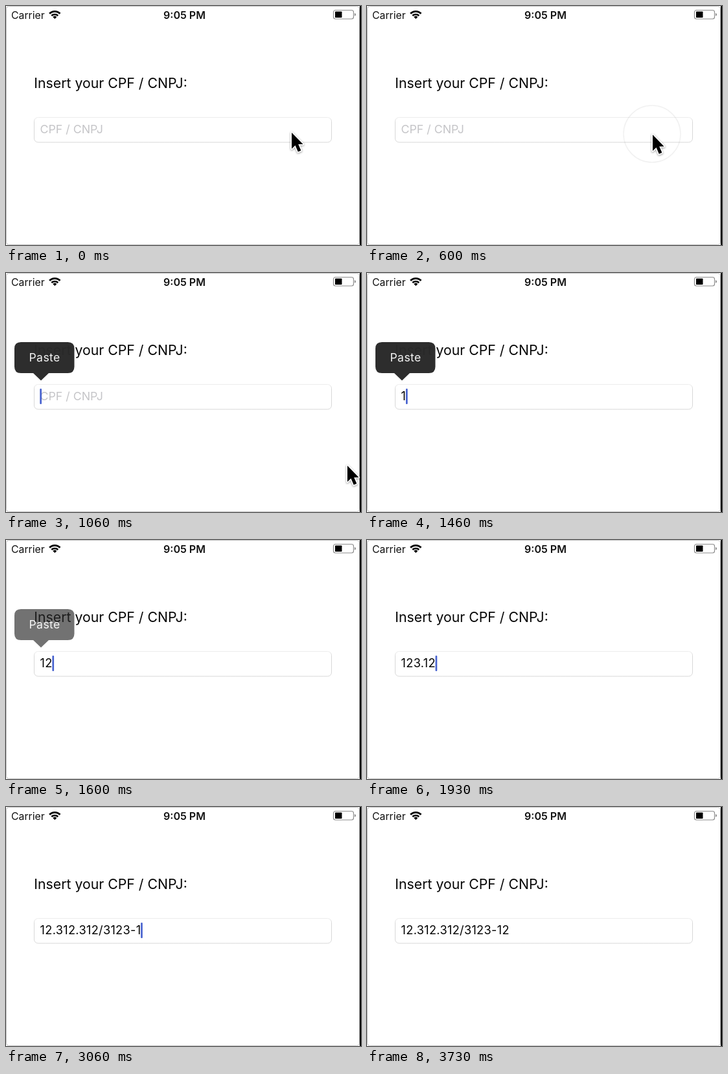
An HTML page that plays this animation: 548x370 px, repeating every 3.8 s.

```html
<!DOCTYPE html>
<html lang="en">
<head>
<meta charset="utf-8">
<title>Document number field</title>
<style>
  html, body { margin: 0; width: 100%; height: 100%; overflow: hidden; background: #fff; }
  svg { display: block; width: 548px; height: 370px; font-family: Inter, "Liberation Sans", sans-serif; }
  text { white-space: pre; }
  #pointer { filter: drop-shadow(0 1.5px 1.5px rgba(0, 0, 0, .4)); }
</style>
</head>
<body>
<svg viewBox="0 0 548 370">
  <linearGradient id="edge" x2="0" y2="1">
    <stop offset="0" stop-color="#ededed"/>
    <stop offset=".15" stop-color="#d8d8d8"/>
  </linearGradient>
  <rect width="548" height="370" fill="#fff"/>
  <rect x="546" width="2" height="370" fill="#000"/>
  <rect x=".5" y=".5" width="545" height="369" rx="4" fill="#fff" stroke="#c4c4c4"/>

  <!-- status bar -->
  <text x="8" y="19.5" font-size="15.8" fill="#111">Carrier</text>
  <g transform="translate(75.3 20)" fill="none" stroke="#000">
    <path d="M-8.2 -8.2A11.6 11.6 0 0 1 8.2 -8.2" stroke-width="2.7"/>
    <path d="M-5 -5A7.1 7.1 0 0 1 5 -5" stroke-width="2.5"/>
    <path d="M0 0L-3 -3A4.3 4.3 0 0 1 3 -3Z" fill="#000" stroke="none"/>
  </g>
  <text x="275.5" y="19.5" font-size="16" font-weight="600" text-anchor="middle" fill="#111">9:05 PM</text>
  <rect x="505.5" y="6.5" width="31" height="13.5" rx="3" fill="none" stroke="#8c8c8c" stroke-width="1.2"/>
  <rect x="508" y="8.5" width="10.5" height="9.5" rx=".8"/>
  <path d="M538 11Q540 11.5 540 13.3T538 15.6Z" fill="#8c8c8c"/>

  <text x="43.3" y="127" font-size="21.25" fill="#060606">Insert your CPF / CNPJ:</text>

  <!-- input -->
  <rect x="43.5" y="172.5" width="459" height="38.5" rx="6" fill="#fff" stroke="url(#edge)"/>
  <text id="hint" x="52.4" y="197.3" font-size="17.8" fill="#c5c5c8">CPF / CNPJ</text>
  <text id="value" x="52.6" y="197.3" font-size="18.2" letter-spacing=".3" fill="#060606"></text>
  <rect id="caret" y="179" width="2.7" height="24" rx="1" fill="#4863cf"/>

  <g id="menu">
    <path d="M23 107H95.5Q105.5 107 105.5 117V145Q105.5 155 95.5 155H66L54 166.5L42 155H23Q13 155 13 145V117Q13 107 23 107Z" fill="#292929" fill-opacity=".98"/>
    <text x="59.6" y="137.3" font-size="17.6" letter-spacing=".4" text-anchor="middle" fill="#f2f2f2">Paste</text>
  </g>

  <circle id="ring" cx="440" cy="198" fill="none" stroke="#777" stroke-width="1.5"/>
  <path id="pointer" d="M0 0V25L5.5 19.8L9.8 29.7L14.4 27.7L10.2 18.1H17.6Z" stroke="#fff" stroke-width="3.4" stroke-linejoin="round" paint-order="stroke"/>
</svg>
<script>
const LOOP = 3800;
const DIGITS = "12312312312312";
// tick at which each digit is typed
const KEYS = [22, 23, 25, 28, 29, 31, 33, 35, 36, 38, 39, 43, 44, 47];
const $ = id => document.getElementById(id);
const [hint, value, caret, menu, ring, pointer] =
  ["hint", "value", "caret", "menu", "ring", "pointer"].map($);

const clamp = x => Math.min(1, Math.max(0, x));
const mix = (a, b, k) => a + (b - a) * k;
const show = (el, alpha) => el.setAttribute("opacity", clamp(alpha));

// 15 ticks per second, starts rounded down to 10 ms
const tickAt = ms => Math.ceil((Math.floor(ms / 10) * 10 + 10) * 3 / 200) - 1;

// Groups digits as 3.3.3-2, or as 2.3.3/4-2 beyond eleven
function format(digits) {
  const long = digits.length > 11;
  const marks = long ? { 2: ".", 5: ".", 8: "/", 12: "-" } : { 3: ".", 6: ".", 9: "-" };
  return [...digits].map((d, i) => (marks[i] || "") + d).join("");
}

function caretAlpha(n) {
  if (n < 10) return 0;
  if (n < 17) return 1;
  if (n < 20) return (19 - n) / 3;
  if (n < 22) return (n - 19) / 3;
  return n < 54 ? 1 : (56 - n) / 3;
}

function menuAlpha(n) {
  if (n < 14 || n > 24) return 0;
  return n < 16 ? mix(.17, 1, (n - 14) / 2) : n < 24 ? 1 : .67;
}

function movePointer(n) {
  const leave = clamp((n - 14) / 2);
  const x = mix(441, 527, leave);
  const y = mix(196, 199.3, clamp((n - 3) / 4)) + 99 * leave;
  pointer.setAttribute("transform", `translate(${x} ${y})`);
  show(pointer, n < 17 ? 1 : 0);
}

function draw(ms) {
  const n = tickAt(ms % LOOP);
  const typed = KEYS.filter(k => k <= n).length;
  value.textContent = format(DIGITS.slice(0, typed));
  show(hint, typed ? 0 : 1);

  const end = typed ? value.getComputedTextLength() : 0;
  caret.setAttribute("x", 52.3 + end);
  show(caret, caretAlpha(n));
  show(menu, menuAlpha(n));

  const spread = (n - 4) / 5;
  ring.setAttribute("r", mix(14, 44, clamp(spread)));
  show(ring, spread < 0 || spread > 1 ? 0 : mix(.4, .1, spread));
  movePointer(n);
}

const start = performance.now();
function loop() {
  draw(performance.now() - start);
  requestAnimationFrame(loop);
}
loop();
</script>
</body>
</html>
```
